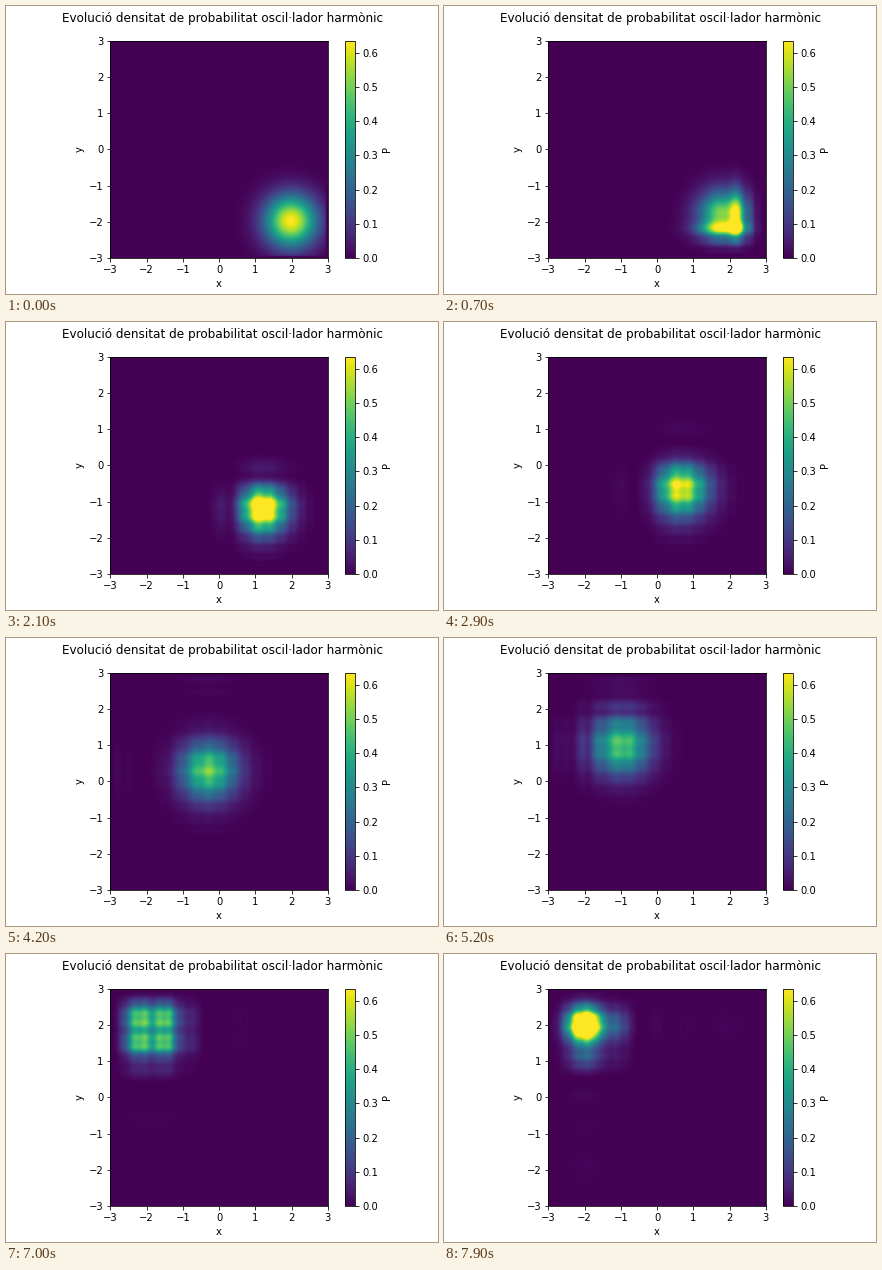
Recreate the animation shown at these times as a matplotlib script. Size 432 by 288 pixels, loop 8000 ms.

```python
import numpy as np
import matplotlib.pyplot as plt
from matplotlib.animation import FuncAnimation

plt.rcParams.update({
    "font.family": "DejaVu Sans",
    "font.size": 10,
    "figure.subplot.bottom": 0.125,
})

L = 3.0        # half width of the box
N = 100        # grid intervals
OMEGA = 2.0    # oscillator frequency (hbar = m = 1)
DT = 0.02      # time step, one per frame
X0 = 2.0       # starting displacement
FRAMES = 80

x = np.linspace(-L, L, N + 1)
dx = x[1] - x[0]
xi = x[1:-1]   # the wave vanishes on the walls

# One-dimensional Hamiltonian; the plane problem is separable
hop = np.full(N - 2, -0.5 / dx**2)
H = np.diag(1 / dx**2 + 0.5 * OMEGA**2 * xi**2) + np.diag(hop, 1) + np.diag(hop, -1)
energy, modes = np.linalg.eigh(H)

psi0 = (OMEGA / np.pi) ** 0.25 * np.exp(-0.5 * OMEGA * (xi - X0) ** 2)
coef = modes.T @ psi0
# Crank-Nicolson phase gained by each mode in one step
phase = -2 * np.arctan(energy * DT / 2)


def density(n):
    """Probability density on the plane after n steps."""
    psi = modes @ (coef * np.exp(1j * n * phase))
    p = np.zeros(N + 1)
    p[1:-1] = np.abs(psi) ** 2
    return np.outer(p[::-1], p)


fig, ax = plt.subplots(figsize=(6, 4), dpi=72)
fig.suptitle("Evolució densitat de probabilitat oscil·lador harmònic")
start = density(0)
image = ax.imshow(start, origin="lower", extent=(-L, L, -L, L),
                  cmap="viridis", vmin=0, vmax=start.max())
ax.set_xlabel("x")
ax.set_ylabel("y")
ax.set_xticks(range(-3, 4))
ax.set_yticks(range(-3, 4))
fig.colorbar(image, ax=ax, label="P")


def update(n):
    image.set_data(density(n))
    return (image,)


anim = FuncAnimation(fig, update, frames=FRAMES, interval=100,
                     repeat=True, repeat_delay=0)
plt.show()
```
